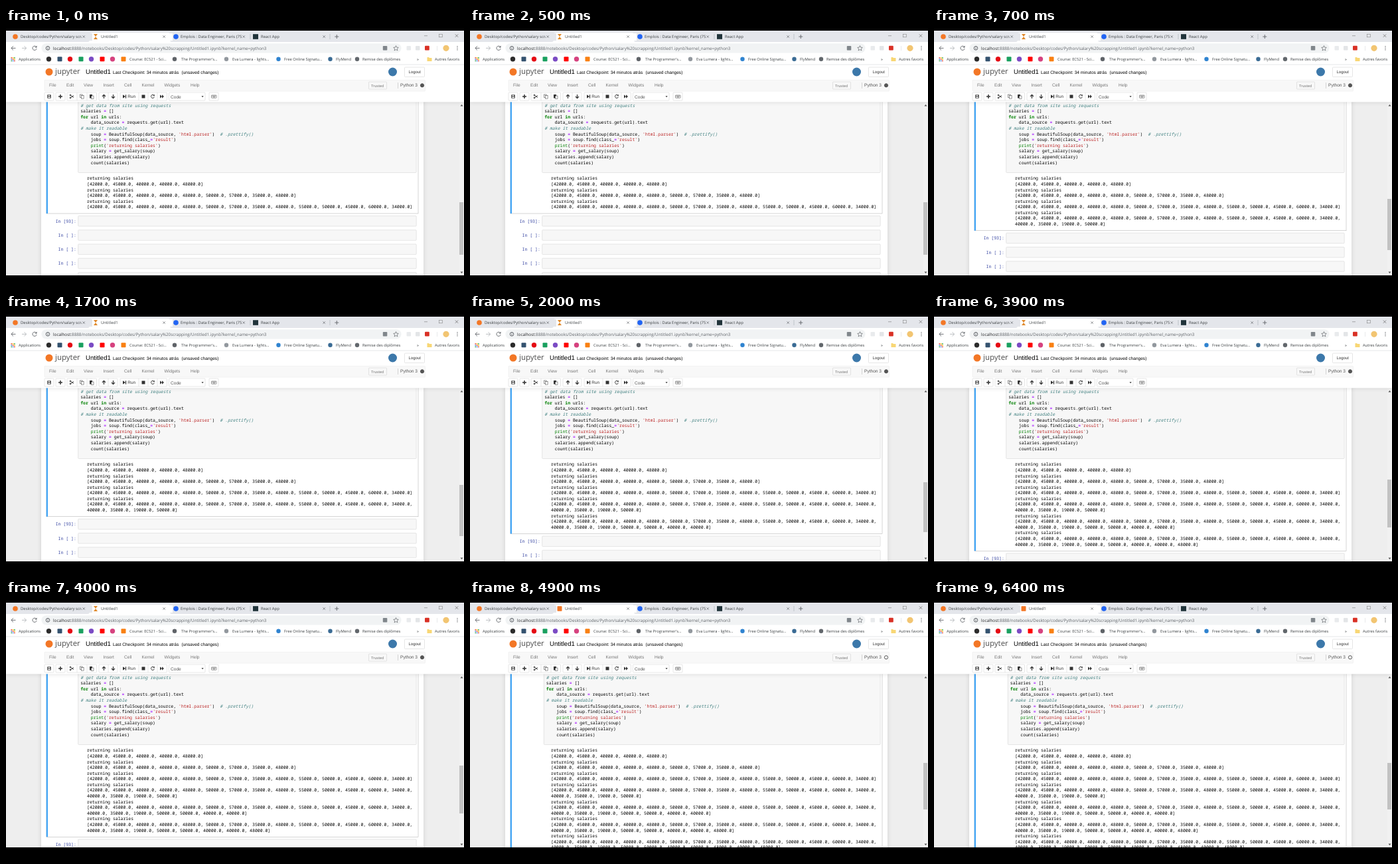
An HTML page that plays this animation: 690 by 388 pixels, repeating every 7100 ms.

```html
<!DOCTYPE html>
<html lang="en">
<head>
<meta charset="utf-8">
<title>Notebook run</title>
<style>
html, body { margin: 0; width: 100%; height: 100%; overflow: hidden; background: #000; }
svg { display: block; }
text { white-space: pre; text-rendering: geometricPrecision; }
.ui { font-family: "Open Sans", sans-serif; }
.nb { font-family: "Liberation Sans", Arial, sans-serif; }
.mono { font-family: "Noto Sans Mono", "DejaVu Sans Mono", monospace; }
.shadow { filter: drop-shadow(0 0 3px rgba(87, 87, 87, .2)); }
</style>
</head>
<body>
<svg id="stage" width="690" height="388" viewBox="0 0 690 388"></svg>
<script>
const LOOP = 7100, LINE = 8.585;
const PRINT_TIMES = [700, 2000, 3300, 4400];
const THUMBS = [[262, 341], [257, 334], [253, 328], [249, 321], [245, 315]];
const COUNTS = [5, 9, 14, 18, 21, 22, 24];
const SALARIES = [42, 45, 40, 40, 48, 50, 57, 35, 48, 55, 50, 45, 60, 34,
  40, 35, 19, 50, 50, 40, 40, 48, 40, 48];
const PER_ROW = 14;
const STRIP = "#e4e6eb";
const CODE = `# get data from site using requests
salaries = []
for url in urls:
    data_source = requests.get(url).text
# make it readable
    soup = BeautifulSoup(data_source, 'html.parser')  # .prettify()
    jobs = soup.find(class_='result')
    print('returning salaries')
    salary = get_salary(soup)
    salaries.append(salary)
    count(salaries)`.split("\n");

const rect = (x, y, w, h, fill, stroke = "none", r = 0) =>
  `<rect x="${x}" y="${y}" width="${w}" height="${h}" rx="${r}" fill="${fill}" stroke="${stroke}" stroke-width=".5"/>`;
const dot = (x, y, r, fill, stroke = "none") =>
  `<circle cx="${x}" cy="${y}" r="${r}" fill="${fill}" stroke="${stroke}"/>`;
const path = (d, stroke = "#5f6368", fill = "none", w = .9) =>
  `<path d="${d}" stroke="${stroke}" fill="${fill}" stroke-width="${w}"/>`;
const solid = (d, fill = "#333") => path(d, "none", fill);
const text = (x, y, s, size, fill, cls, extra = "") =>
  `<text x="${x}" y="${y}" font-size="${size}" fill="${fill}" class="${cls}" ${extra}>${s}</text>`;
const ui = (x, y, s, fill = "#3c4043", size = 5.8) => text(x, y, s, size, fill, "ui");
const nb = (x, y, s, fill = "#333", size = 6.57) => text(x, y, s, size, fill, "nb");
const mono = (x, y, s, fill = "#000", extra = "") => text(x, y, s, 6.495, fill, "mono", extra);
const cross = (x, y, r, c) => path(`M${x - r} ${y - r}l${2 * r} ${2 * r}m0 ${-2 * r}l${-2 * r} ${2 * r}`, c, "none", .7);

function highlight(line) {
  const styles = ['fill="#408080" font-style="italic"', 'fill="#ba2121"',
    'fill="#008000" font-weight="bold"', 'fill="#008000"', 'fill="#aa22ff" font-weight="bold"'];
  return line.replace(/(#.*)|('.*?')|\b(for|in)\b|\b(print)\b|(=)/g, (m, ...groups) =>
    `<tspan ${styles[groups.slice(0, 5).findIndex(Boolean)]}>${m}</tspan>`);
}

function outputLines(prints) {
  return COUNTS.slice(0, prints).flatMap(n => {
    const all = SALARIES.slice(0, n).map(v => v + "000.0");
    const rows = ["[" + all.slice(0, PER_ROW).join(", ")];
    if (n > PER_ROW) {
      rows[0] += ",";
      rows.push(all.slice(PER_ROW).join(", "));
    }
    rows[rows.length - 1] += "]";
    return ["returning salaries", ...rows];
  });
}

function notebook(step) {
  const done = step === 4, shift = done ? 2.6 : 0;
  const lines = outputLines(step + 3);
  const bottom = 279 + LINE * (lines.length - 6);
  let s = rect(0, 55, 690, 320, "#eee") +
    `<g class="shadow">${rect(53, 100, 576, 300, "#fff")}</g>` +
    rect(61, 90, 560, bottom - 90, "#fff", "#ababab") +
    rect(60.7, 90, 2.3, bottom - 90, "#42a5f5") +
    rect(108.7 + shift, 90, 509.5 - shift, 127.5, "#f7f7f7", "#cfcfcf", 1);
  CODE.forEach((l, i) => s += mono(112.2 + shift, 118.7 + i * LINE, highlight(l)));
  lines.forEach((l, i) => s += mono(122, 228.4 + i * LINE, l));
  for (let i = 0; i < 5; i++) {
    const y = bottom + 3.5 + i * 21.25;
    s += rect(108.7, y, 509.5, 15.6, "#f7f7f7", "#cfcfcf", 1) +
      mono(105.8, y + 10, i ? "In [ ]:" : "In [93]:", "#303f9f", 'text-anchor="end"');
  }
  const [top, end] = THUMBS[step];
  return s + rect(683, 111, 7, 262, "#f1f1f1") + rect(683, top, 6, end - top, "#c1c1c1") +
    solid("M684.5 117.5l2-2.5 2 2.5z", "#505050") + solid("M684.5 366.5l2 2.5 2-2.5z", "#505050");
}

function header(done) {
  let s = `<g class="shadow">${rect(0, 55, 690, 56.3, "#fff")}</g>` +
    dot(65, 66, 5.5, "#f37726") + text(74, 69, "jupyter", 11.5, "#4e4e4e", "ui") +
    nb(120, 69.2, "Untitled1", "#000", 9.6) +
    nb(161, 68.7, "Last Checkpoint: 34 minutos atrás", "#000") + nb(264.5, 68.7, "(unsaved changes)", "#000") +
    dot(582.5, 66, 6.5, "#3c78aa") +
    rect(600.5, 59, 30, 14.5, "#fff", "#ccc", 1) + nb(606.5, 68.4, "Logout", "#333", 6.06) +
    rect(58, 78.3, 573.5, 16.7, "#f8f8f8", "#e7e7e7", 1);
  for (const [x, label] of [[65, "File"], [91, "Edit"], [117, "View"], [146.5, "Insert"],
    [178, "Cell"], [204.5, "Kernel"], [238.5, "Widgets"], [278, "Help"]]) s += nb(x, 88.4, label, "#777");
  s += rect(546.5, 81, 27, 11, "#f8f8f8", "#ccc", 1) + nb(550, 88.5, "Trusted", "#777", 5.7) +
    path("M590.5 82v9", "#bbb", "none", .6) + nb(594, 88.4, "Python 3", "#555") +
    dot(627, 86.3, 2.6, done ? "#fff" : "#555", "#555");
  for (const [x, w] of [[58, 14], [75, 14], [92, 44.5], [140, 28], [172, 70.5], [245.5, 54.5], [306, 14]])
    s += rect(x, 97, w, 12, "#fff", "#ccc", 1);
  for (const x of [107, 122, 154, 200, 214, 228]) s += path(`M${x} 97v12`, "#ccc", "none", .5);
  const ink = "#333";
  return s + rect(62.3, 100.3, 5.4, 5.4, ink, "none", .6) + rect(63.6, 100.8, 2.6, 1.6, "#fff") + rect(63.4, 103.4, 3.2, 1.8, "#fff") +
    path("M79 103h6M82 100v6", ink, "none", 1.5) +
    path("M97 101l5 3.5M97 105l5-3.5", ink) + dot(97, 101, .9, "#fff", ink) + dot(97, 105, .9, "#fff", ink) +
    rect(111.5, 100, 3.6, 4.5, "#fff", ink) + rect(113.5, 101.6, 3.6, 4.5, "#fff", ink) +
    rect(126, 100, 4, 5.5, ink) + rect(128.5, 102, 3.5, 4.4, "#fff", ink) +
    path("M147.5 106v-5.5M145 103l2.5-2.6 2.5 2.6", ink, "none", 1.2) +
    path("M161.5 100v5.5M159 103l2.5 2.6 2.5-2.6", ink, "none", 1.2) +
    solid("M176 100.3l4 2.7-4 2.7z") + rect(180, 100.3, 1.1, 5.4, ink) + nb(183.3, 105.4, "Run", ink, 6.4) +
    rect(204.5, 100.5, 5, 5, ink) +
    path("M223 101.4a2.5 2.5 0 1 0 .4 2.3", ink, "none", 1) + solid("M223.8 99.8v2.5h-2.5z") +
    solid("M232 100.3l3 2.7-3 2.7zM235 100.3l3 2.7-3 2.7z") +
    nb(248, 105.8, "Code", "#555") + solid("M294.5 102.2h3.2l-1.6 2z") +
    rect(309.5, 101, 7.5, 4.2, "#fff", ink, .5) + path("M310.5 102.4h5.5M311.5 104h3.5", ink, "none", .6);
}

function tabs(done) {
  let s = rect(0, 4, 690, 17, STRIP) + solid("M123 21q3 0 3-3v-8q0-3 3-3h115q3 0 3 3v8q0 3 3 3z", "#fff");
  const list = [[22, "Desktop/codes/Python/salary scra", STRIP], [143, "Untitled1", "#fff"],
    [263, "Emplois : Data Engineer, Paris (75)", STRIP], [384, "React App", STRIP]];
  for (const [x, label, bg] of list)
    s += ui(x, 15.1, label, "#3c4043", 5.95) + rect(x + 92, 8, 16, 11, bg) + cross(x + 95.2, 13, 1.7, "#5f6368");
  s += dot(14, 13, 3.8, "#f37726") + dot(256, 13, 3.8, "#2164f3") + rect(372, 9.2, 8, 7.6, "#20333a");
  s += done ? rect(131.5, 9.2, 7, 7.6, "#f37726", "none", .8)
    : solid("M132 9h6l-3 4 3 4h-6l3-4z", "#e08a2c");
  return s + path("M368 9v8M488 9v8", "#9aa0a6", "none", .5) + path("M495.3 13h6M498.3 10v6") +
    path("M630 11.7h5", "#777", "none", .6) + rect(652.7, 9.2, 4.6, 4.6, "none", "#777") + cross(679, 11.6, 2.2, "#666");
}

function addressBar() {
  let s = rect(0, 21, 690, 34, "#fff") +
    path("M14.5 30.3h-6.5M11 27.2l-3.1 3.1 3.1 3.1") + path("M24 30.3h6.5M27.5 27.2l3.1 3.1-3.1 3.1", "#b5b8bc") +
    path("M45.5 28.3a3.1 3.1 0 1 0 .6 2.7") + solid("M46.5 26.5v3h-3z", "#5f6368") +
    rect(53.5, 23.3, 542, 14.2, "#f1f3f4", "none", 7) +
    dot(63, 30.3, 2.8, "none", "#5f6368") + path("M63 29.8v2M63 28.4v.8") +
    text(71, 32.5, '<tspan fill="#202124">localhost</tspan>:8888/notebooks/Desktop/codes/Python/salary%20scrapping/Untitled1.ipynb?kernel_name=python3', 6.31, "#5f6368", "ui");
  s += rect(567.8, 27, 6.5, 6.5, "#80868b", "none", .8) +
    path("M587.5 26.6l1.1 2.5 2.7.3-2 1.8.6 2.7-2.4-1.4-2.4 1.4.6-2.7-2-1.8 2.7-.3z", "#5f6368", "none", .7) +
    rect(603.5, 27, 6.5, 6.5, "#e9ebed", "none", 1) + rect(617, 27, 6.5, 6.5, "#e3e5e7", "none", 1) +
    rect(631, 26.8, 6.8, 6.8, "#d93025", "none", 1) + path("M649.5 27v7", "#dadce0", "none", .6) +
    dot(663, 30.3, 4.6, "#f2c572");
  for (const y of [27.8, 30.3, 32.8]) s += dot(680, y, .7, "#5f6368");
  return s;
}

function bookmarks() {
  let s = "";
  const palette = ["#ea4335", "#fbbc05", "#34a853", "#4285f4"];
  for (let i = 0; i < 9; i++) s += rect(7.5 + i % 3 * 2.3, 44 + (i / 3 | 0) * 2.3, 1.6, 1.6, palette[i % 4]);
  ["#2b2b2b", "#34526f", "#e50914", "#19a05f", "#7b4bc4", "#ff0000", "#d6427f", "#f98012"]
    .forEach((c, i) => s += i % 2 ? rect(77.5 + (i - 1) * 16, 43.3, 7, 7, c, "none", 1) : dot(64.5 + i * 16, 46.8, 3.7, c));
  for (const [x, c] of [[254, "#5f6368"], [332, "#92989e"], [410.5, "#2f83d0"], [488.5, "#3a6b94"], [529, "#62676c"]])
    s += dot(x, 46.8, 3.2, c);
  for (const [x, label] of [[19, "Applications"], [186, "Course: EC521 - Sci..."], [264, "The Programmer's..."],
    [341, "Eva Lumera - lights..."], [419, "Free Online Signatu..."], [497, "FlyMend"],
    [537, "Remise des diplômes"], [619, "»"], [646, "Autres favoris"]]) s += ui(x, 48.8, label);
  return s + solid("M634.5 44h2.5l1 1h3.5v5h-7z", "#f8d775") + path("M0 55h690", "#d5d7da", "none", .6);
}

function draw(step) {
  const done = step === 4;
  return notebook(step) + header(done) + tabs(done) + addressBar() + bookmarks() +
    rect(0, 0, 690, 4, "#000") + rect(0, 372, 690, 16, "#000");
}

const stage = document.getElementById("stage");
const start = performance.now();
let shown = -1;
function tick() {
  const t = (performance.now() - start) % LOOP;
  const step = PRINT_TIMES.filter(at => t >= at).length;
  if (step !== shown) stage.innerHTML = draw(shown = step);
  requestAnimationFrame(tick);
}
tick();
</script>
</body>
</html>
```
